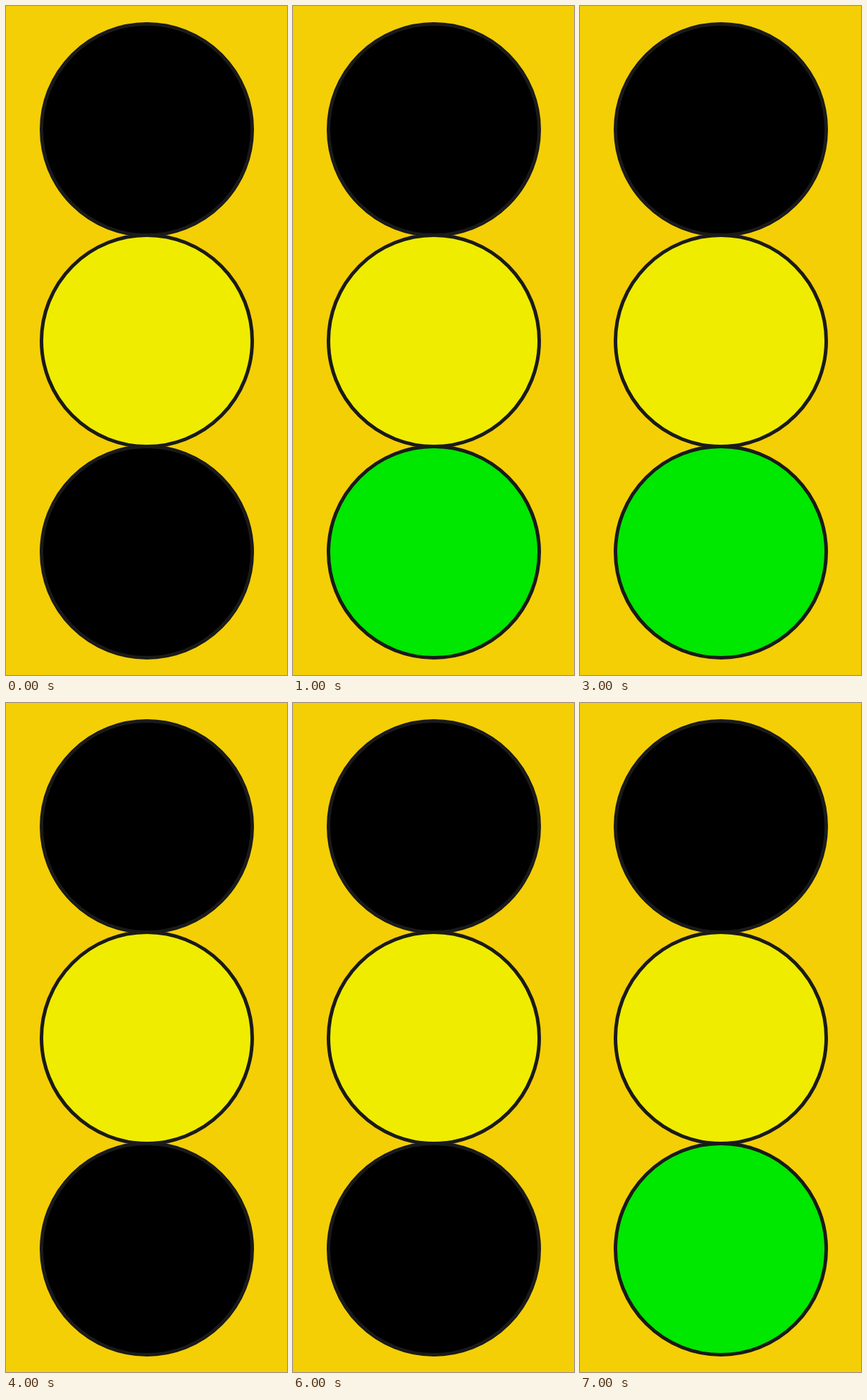
Animation, 400 px wide and 950 px high, one loop 8 s. Source, as an HTML page:

```html
<!DOCTYPE html>
<html lang="en">
<head>
<meta charset="utf-8">
<title>Traffic light</title>
<style>
  html, body { margin: 0; width: 100%; height: 100%; overflow: hidden; background: #f4cf06; }
  svg { display: block; }
  circle { stroke: #1a1a1a; stroke-width: 5; }
</style>
</head>
<body>
<svg width="400" height="950" viewBox="0 0 400 950">
  <rect width="400" height="950" fill="#f4cf06"/>
  <circle cx="200.5" cy="175.5" r="150" fill="#000"/>
  <circle cx="200.5" cy="475.5" r="150" fill="#efec00"/>
  <circle id="go" cx="200.5" cy="775.5" r="150" fill="#000"/>
</svg>
<script>
  const LOOP = 8000, STEP = 1000;
  const go = document.getElementById('go');
  const start = performance.now();

  // The green lamp is lit during every second step.
  function draw(t) {
    const lit = Math.floor(t / STEP) % 2 === 1;
    go.setAttribute('fill', lit ? '#00e700' : '#000');
  }

  function tick() {
    draw((performance.now() - start) % LOOP);
    requestAnimationFrame(tick);
  }
  tick();
</script>
</body>
</html>
```
